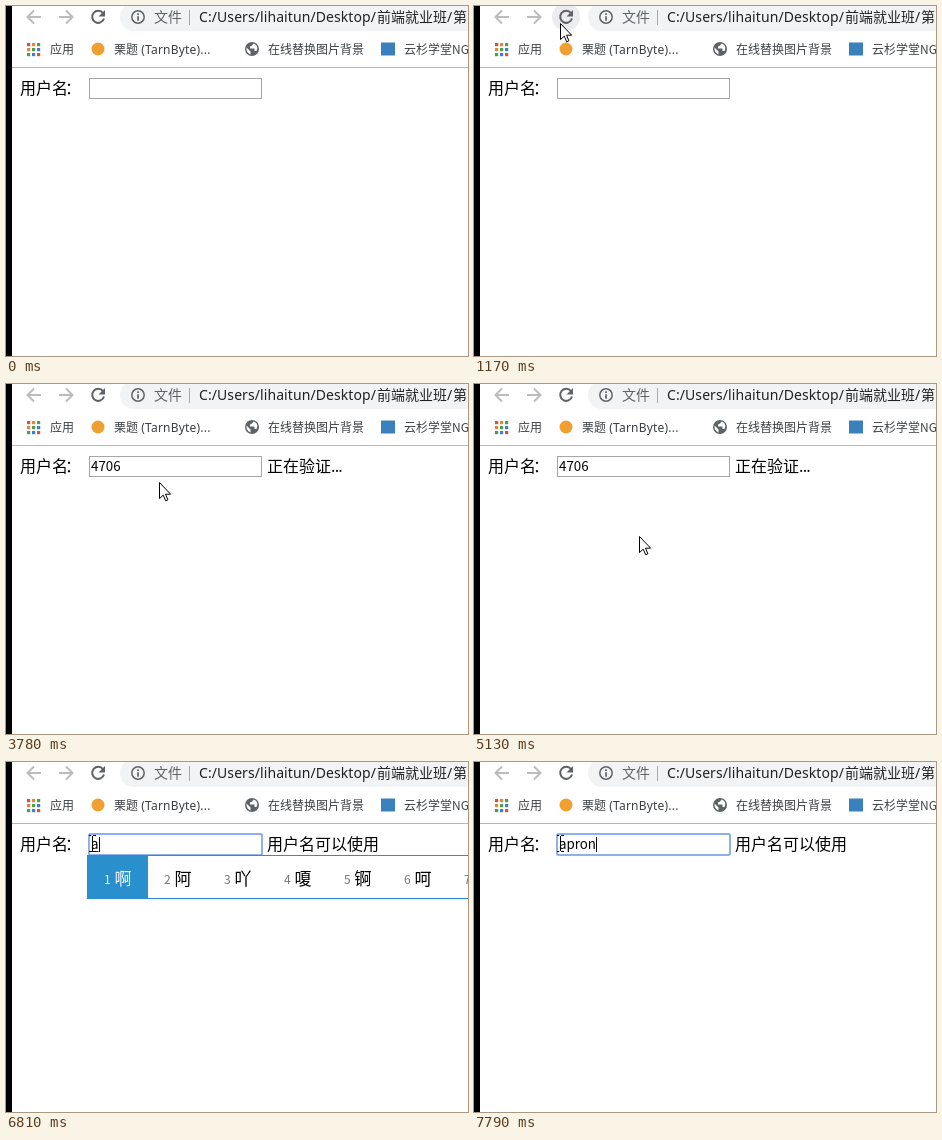
Write an HTML page that moves like this. It is 462 px wide and 350 px high and loops after 8000 ms.

```html
<!DOCTYPE html>
<html lang="zh-CN">
<head>
<meta charset="utf-8">
<title>用户名验证</title>
<style>
html, body { margin: 0; width: 100%; height: 100%; overflow: hidden; background: #fff; }
svg { display: block; width: 462px; height: 350px; }
text { font-family: "Noto Sans CJK SC", "Noto Sans CJK", sans-serif; white-space: pre; }
.latin { font-family: "Noto Sans", "Open Sans", "Noto Sans CJK SC", sans-serif; }
.bar { font-size: 14px; fill: #202124; }
.mark { font-size: 12px; fill: #3c4043; }
.page { font-size: 16px; }
.field { font-size: 13.333px; }
.num { font-size: 12px; fill: #777; }
.cand { font-size: 17px; }
.chosen { fill: #fff; }
.icon { fill: none; stroke: #5f6368; stroke-width: 2; }
.off { stroke: #babcbe; }
</style>
</head>
<body>
<svg viewBox="0 0 462 350" xmlns="http://www.w3.org/2000/svg">
  <rect width="462" height="350" fill="#fff"/>

  <circle id="hover" cx="92" cy="11" r="14" fill="#ececee"/>
  <path class="icon off" d="M35 11H22M28 4.5L21.5 11L28 17.5"/>
  <path class="icon off" d="M53 11H66M60 4.5L66.5 11L60 17.5"/>
  <path class="icon" d="M97 7.2A6 6 0 1 0 98 12.5"/>
  <path d="M99 4V10.5H92.5Z" fill="#5f6368"/>
  <rect x="114" y="-3" width="380" height="28" rx="14" fill="#f1f3f4"/>
  <circle class="icon" cx="132" cy="11" r="6.2" style="stroke-width:1.5"/>
  <path d="M131.2 7.3h1.7v1.7h-1.7zM131.2 10.2h1.7v4.5h-1.7z" fill="#5f6368"/>
  <text class="bar" x="148" y="16" style="fill:#5f6368">文件</text>
  <path d="M183.5 4V19" stroke="#a5a8ac"/>
  <text class="bar latin" x="193" y="16" letter-spacing=".08">C:/Users/lihaitun/Desktop/</text>
  <text class="bar" x="371" y="16">前端就业班</text>
  <text class="bar latin" x="441" y="16">/</text>
  <text class="bar" x="447" y="16">第</text>

  <g id="apps"></g>
  <text class="mark" x="44" y="48">应用</text>
  <circle cx="92" cy="43" r="6.5" fill="#f0a030"/>
  <text class="mark" x="108" y="48">栗题</text>
  <text class="mark latin" x="132" y="48" letter-spacing=".2"> (TarnByte)...</text>
  <circle cx="246" cy="43" r="7" fill="#5f6368"/>
  <path d="M240.5 41.5L244.5 45.5V48.5Q240 46.5 240.5 41.5ZM247.5 37.6Q246.5 40 244 40.5V42.5H248.5V45H250.5Q252.5 41 249.5 38.5Z" fill="#fff"/>
  <text class="mark" x="262" y="48">在线替换图片背景</text>
  <rect x="375" y="36.5" width="14" height="13" fill="#3a80bd"/>
  <text class="mark" x="398" y="48">云杉学堂NG</text>
  <path d="M6 61.5H462" stroke="#b5b7b9"/>

  <text class="page" x="14" y="87.5">用户名<tspan dx="-3">：</tspan></text>
  <rect id="box" x="83.5" y="72.5" width="172" height="20" fill="#fff"/>
  <rect id="sel" y="74" height="17" fill="#3390ff"/>
  <text id="value" class="field" x="85" y="87"></text>
  <text id="picked" class="field chosen" y="87"></text>
  <path id="under" stroke="#222"/>
  <path id="caret" stroke="#000"/>
  <text id="status" class="page" x="261" y="87.5"></text>
  <text id="dots" class="page" x="325" y="87.5" letter-spacing="-.8">...</text>

  <g id="ime">
    <rect x="81" y="93" width="400" height="44" fill="#fff"/>
    <path d="M81 93.5H462M81 136.5H462" stroke="#2b8fc9"/>
    <rect id="first" x="81" y="94" height="43" fill="#2a90cd"/>
    <g id="list"></g>
  </g>

  <path id="arrow" d="M.5 .5V16.6L4.2 13.1L6.7 18.8L8.9 17.8L6.5 12.2H11.6Z" fill="#fff" stroke="#000"/>
  <path id="beam" d="M-3 -7.5H-.8M1.2 -7.5H4M-3 8.5H-.8M1.2 8.5H4M.5 -7V8" fill="none" stroke="#000"/>
  <rect width="6" height="350" fill="#000"/>
</svg>
<script>
const LOOP = 8000, STEP = 62;
const PRESS = 6000, RELEASE = 6370, RETYPE = 6810, COMMIT = 7790;
const $ = id => document.getElementById(id);
const show = (el, on) => el.setAttribute('visibility', on ? 'visible' : 'hidden');
const set = (el, attrs) => { for (const k in attrs) el.setAttribute(k, attrs[k]); };
const add = (parent, tag, attrs, text = '') => {
  const el = document.createElementNS('http://www.w3.org/2000/svg', tag);
  set(el, attrs);
  el.textContent = text;
  parent.appendChild(el);
};
const within = (t, a, b) => t >= a && t < b;

const hues = ['#d8503f', '#e0883a', '#4f9a55', '#3f7fd0'];
for (let i = 0; i < 9; i++) {
  const col = i % 3, row = Math.floor(i / 3);
  add($('apps'), 'rect', { x: 21 + col * 5, y: 37 + row * 5, width: 3.2, height: 3.2, fill: hues[(col + row) % 4] });
}

// Glides of the mouse from wherever it rests: [start, end, x, y].
const glides = [
  [110, 870, 88, 32],
  [920, 1170, 86, 17],
  [1230, 1410, 137, 68],
  [1610, 1610, 142, 74],
  [2780, 2960, 212, 250],
  [3460, 3780, 153, 98],
  [3840, 4200, 164, 156],
  [5130, 5130, 165, 152],
  [5200, 5870, 152, 98],
  [5940, 6120, 75, 76],
  [RELEASE, RELEASE, 86, 81]
];

function pointer(t) {
  let x = 415, y = 360;
  for (const [start, end, tx, ty] of glides) {
    if (t < start) break;
    const n = Math.round((end - start) / STEP) + 1;
    const done = Math.min(n, Math.floor((t - start) / STEP) + 1);
    const k = t >= end ? 1 : Math.sin(done / n * Math.PI / 2);
    x += (tx - x) * k;
    y += (ty - y) * k;
  }
  return { x: Math.round(x), y: Math.round(y) };
}

function typed(t) {
  if (t >= RETYPE) {
    const keys = [RETYPE, 6990, 7310, 7420, 7560];
    return 'apron'.slice(0, keys.filter(k => k <= t).length);
  }
  return '4706'.slice(0, Math.max(0, Math.floor((t - 2300) / 116) + 1));
}

const words = {
  a: '啊 阿 吖 嗄 锕 呵 腌',
  ap: '安排 阿婆 安培 安平 爱拍',
  apr: '安排人 安排让 阿婆让 爱拍人',
  apro: '安排弱 安排若 阿婆肉 爱拍若',
  apron: '安排热 阿婆弱 安排柔 爱拍柔'
};

function drawList(key) {
  const list = $('list');
  if (list.dataset.key === key) return;
  list.dataset.key = key;
  list.textContent = '';
  let x = 98;
  words[key].split(' ').forEach((word, i) => {
    const chosen = i ? '' : ' chosen';
    add(list, 'text', { class: 'num' + chosen, x, y: 121.5 }, i + 1);
    add(list, 'text', { class: 'cand' + chosen, x: x + 10.5, y: 122.5 }, word);
    x += 43 + 17 * word.length;
    if (!i) $('first').setAttribute('width', x - 97);
  });
}

function drawPointer(t, { x, y }) {
  const overBox = within(x, 83, 257) && within(y, 71, 94);
  const beam = overBox || within(t, PRESS, RELEASE);
  show($('beam'), beam);
  show($('arrow'), !beam && t >= 110);
  $(beam ? 'beam' : 'arrow').setAttribute('transform', `translate(${x} ${y})`);
  show($('hover'), Math.hypot(x - 92, y - 11) < 14);
}

function drawField(t, mouse) {
  const focus = within(t, 1610, 3210) || t >= PRESS;
  set($('box'), focus
    ? { x: 83, y: 72, width: 173, height: 21, stroke: '#6a98e6', 'stroke-width': 1.5, rx: 1 }
    : { x: 83.5, y: 72.5, width: 172, height: 20, stroke: '#a6a6a6', 'stroke-width': 1, rx: 0 });

  const text = typed(t), value = $('value');
  value.textContent = text;
  const edge = n => 85 + (n ? value.getSubStringLength(0, n) : 0);
  const end = edge(text.length);

  // Dragging selects from the nearest letter gap to the end.
  const picking = within(t, PRESS, RETYPE);
  show($('sel'), picking);
  show($('picked'), picking);
  if (picking) {
    const gap = Math.round((mouse.x - 85) / (end - 85) * text.length);
    const from = Math.max(0, Math.min(text.length, gap));
    set($('sel'), { x: edge(from), width: end - edge(from) });
    $('picked').setAttribute('x', edge(from));
    $('picked').textContent = text.slice(from);
  }

  show($('caret'), focus && !picking && !within(t, 2160, 2300));
  $('caret').setAttribute('d', `M${Math.round(end) + .5} 75V90`);

  const composing = within(t, RETYPE, COMMIT);
  show($('under'), composing);
  show($('ime'), composing);
  $('under').setAttribute('d', `M85 89.5H${end}`);
  if (composing) drawList(text);
}

function draw(t) {
  const mouse = pointer(t);
  drawPointer(t, mouse);
  drawField(t, mouse);
  const checking = within(t, 3210, 5260);
  $('status').textContent = checking ? '正在验证' : t >= 5260 ? '用户名可以使用' : '';
  show($('dots'), checking);
}

const begin = performance.now();
function tick() {
  draw((performance.now() - begin) % LOOP);
  requestAnimationFrame(tick);
}
tick();
</script>
</body>
</html>
```
